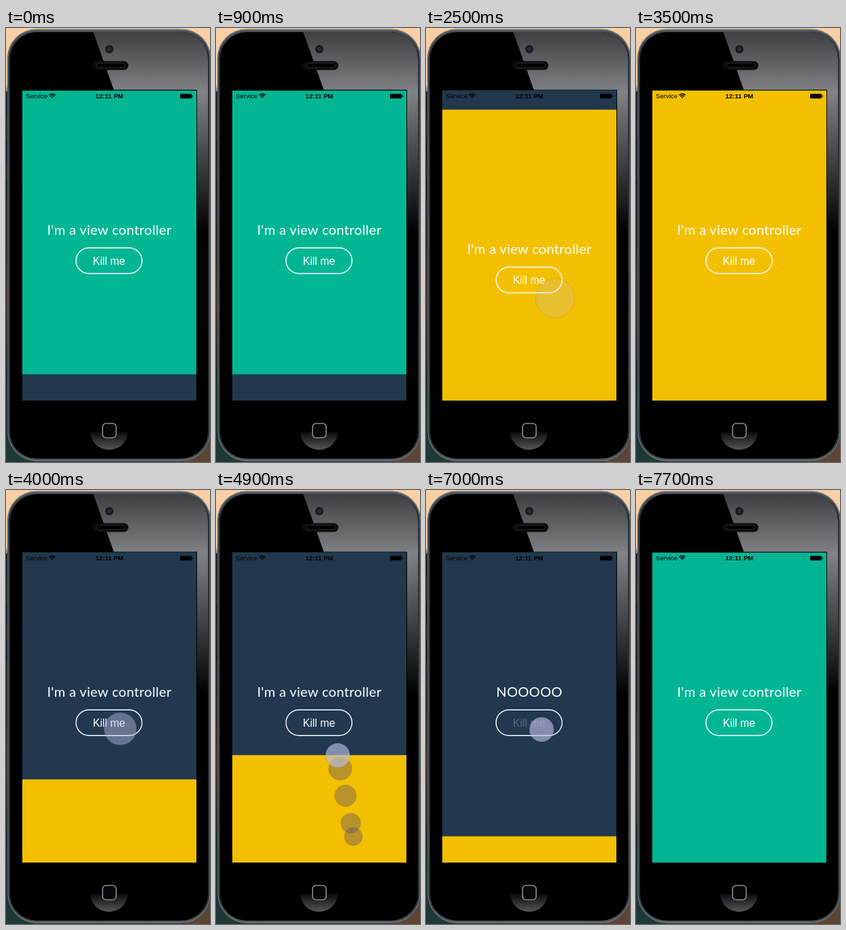
An HTML page for the animation above (8000 ms loop, 300 px wide and 636 px high).

```html
<!DOCTYPE html>
<html lang="en">
<head>
<meta charset="utf-8">
<title>Stacked view controllers</title>
<style>
  html, body { margin: 0; width: 100%; height: 100%; overflow: hidden; background: #facfa5; }
  svg { display: block; width: 300px; height: 636px; }
  text { text-anchor: middle; }
  .title { font: 20px Lato, sans-serif; letter-spacing: .33px; fill: #fff; }
  .label { font: 15.8px "Liberation Sans", Arial, sans-serif; fill: #fff; }
  .status { font: 9.6px "Liberation Sans", Arial, sans-serif; fill: #000; }
  .clock { font-weight: 700; }
</style>
</head>
<body>
<svg viewBox="0 0 300 636">
  <defs>
    <linearGradient id="back" x2="0" y2="1">
      <stop offset="0" stop-color="#facfa5"/>
      <stop offset=".13" stop-color="#f3c9a2"/>
      <stop offset=".16" stop-color="#20292c"/>
      <stop offset=".5" stop-color="#2c2523"/>
      <stop offset=".62" stop-color="#4b3429"/>
      <stop offset=".8" stop-color="#182a2c"/>
      <stop offset="1" stop-color="#1f3a36"/>
    </linearGradient>
    <linearGradient id="rim" x2="0" y2="1">
      <stop offset="0" stop-color="#4c555c"/>
      <stop offset=".06" stop-color="#262d32"/>
      <stop offset=".5" stop-color="#2a3135"/>
      <stop offset=".94" stop-color="#2c3338"/>
      <stop offset="1" stop-color="#50575c"/>
    </linearGradient>
    <linearGradient id="gloss" gradientUnits="userSpaceOnUse" x1="0" y1="5" x2="0" y2="300">
      <stop offset="0" stop-color="#3c3e41"/>
      <stop offset=".3" stop-color="#808285"/>
      <stop offset=".6" stop-color="#48494c"/>
      <stop offset="1" stop-color="#000"/>
    </linearGradient>
    <linearGradient id="home" x2="0" y2="1">
      <stop offset="0" stop-color="#0b0b0c"/>
      <stop offset="1" stop-color="#55565a"/>
    </linearGradient>
    <clipPath id="face"><rect x="6" y="6" width="291" height="625" rx="39"/></clipPath>
    <clipPath id="screen"><rect x="24" y="91.5" width="256" height="454.5"/></clipPath>
  </defs>

  <rect width="300" height="636" fill="url(#back)"/>
  <path d="M270 0h30v90h-5z" fill="#facfa5"/>
  <path d="M262 636h38v-50z" fill="#5e4434"/>
  <g fill="#1a2125">
    <rect y="93" width="4" height="34"/>
    <rect y="166" width="4" height="30"/>
    <rect y="222" width="4" height="30"/>
  </g>
  <rect x="2" y="1.5" width="299" height="633.5" rx="43" fill="url(#rim)"/>
  <rect x="3" y="2.5" width="297" height="631.5" rx="42" fill="none" stroke="#7b858c"/>
  <rect x="6" y="6" width="291" height="625" rx="39" fill="#000"/>
  <path d="M128 5H298V300H230L159 92Z" fill="url(#gloss)" clip-path="url(#face)"/>

  <circle cx="152" cy="31" r="6" fill="#17181b"/>
  <circle cx="152" cy="31" r="3" fill="#292c3d"/>
  <rect x="127" y="48.5" width="53" height="13" rx="6.5" fill="#0c0c0d"/>
  <rect x="133" y="51.5" width="42" height="6.5" rx="3.2" fill="#000" stroke="#323437" stroke-width=".8"/>

  <path d="M124 592H179A27.5 26 0 0 1 124 592Z" fill="url(#home)"/>
  <rect x="142" y="579.5" width="20" height="21" rx="5" fill="#08080a" stroke="#8b8d90" stroke-width="1.6"/>
  <rect x="23" y="90.5" width="258" height="456.5"/>

  <g clip-path="url(#screen)">
    <g id="cards"></g>
    <text class="status" x="29" y="103" style="text-anchor:start">Service</text>
    <g fill="none" stroke="#000" stroke-width="1.4">
      <path d="M63.4 98.4Q68 94.4 72.6 98.4M65.2 100.4Q68 98 70.8 100.4"/>
      <path d="M66.4 101.2H69.6L68 103.2Z" fill="#000" stroke="none"/>
    </g>
    <text class="status clock" x="152" y="103">12:11 PM</text>
    <rect x="256" y="96.5" width="17" height="6.8" rx="1.3"/>
    <rect x="273.6" y="98.6" width="1.4" height="2.6" rx=".6"/>
  </g>
  <g id="touches"></g>
</svg>

<script>
const LOOP = 8000, STEP = 100;
const TOP = 92, PEEK = 508, SLIDE = 456;
const TAP = { at: 6860, dur: 190, from: [170, 351], to: [170, 351] };
const KILL = { at: 7100, dur: 500 };
const SWIPES = [
  { card: 'navy',   at: 965,  dur: 270, from: [204, 508], to: [192, 340], rest: TOP },
  { card: 'yellow', at: 2127, dur: 190, from: [204, 508], to: [190, 396], rest: TOP },
  { card: 'yellow', at: 3620, dur: 300, from: [175, 170], to: [168, 350], rest: PEEK },
  { card: 'yellow', at: 4697, dur: 205, from: [202, 508], to: [179, 389], rest: TOP },
  { card: 'yellow', at: 5900, dur: 300, from: [175, 170], to: [168, 350], rest: PEEK }
];

const clamp = v => Math.min(1, Math.max(0, v));
const smooth = v => v * v * (3 - 2 * v);
const $ = id => document.getElementById(id);

function add(parent, tag, attrs, text) {
  const el = document.createElementNS('http://www.w3.org/2000/svg', tag);
  for (const k in attrs) el.setAttribute(k, attrs[k]);
  if (text) el.textContent = text;
  return parent.appendChild(el);
}

function makeCard(color) {
  const g = add($('cards'), 'g', {});
  add(g, 'rect', { x: 24, y: TOP - .5, width: 256, height: 457, fill: color });
  const title = add(g, 'text', { class: 'title', x: 152, y: 303 }, "I'm a view controller");
  add(g, 'rect', { x: 103, y: 322.3, width: 97, height: 37.5, rx: 18.75,
    fill: 'none', stroke: '#fff', 'stroke-width': 1.4 });
  const label = add(g, 'text', { class: 'label', x: 151.5, y: 346.8 }, 'Kill me');
  return { title, label, moveTo: y => g.setAttribute('transform', `translate(0 ${y - TOP})`) };
}

makeCard('#02b694');
const navy = makeCard('#21384f');
const yellow = makeCard('#f3c000');

const trail = Array.from({ length: 5 }, () => add($('touches'), 'circle', { fill: '#5c4c68' }));
const finger = add($('touches'), 'circle', { fill: '#bcbee0', stroke: '#55586a' });

function pointAt(s, t) {
  const p = smooth(clamp((t - s.at) / s.dur));
  return s.from.map((v, i) => v + (s.to[i] - v) * p);
}

// Follows the finger, then decays towards the resting place.
function cardY(name, t) {
  let y = PEEK;
  for (const s of SWIPES) {
    if (s.card !== name || t < s.at) continue;
    y += pointAt(s, t)[1] - s.from[1];
    const since = t - s.at - s.dur;
    if (since > 0) y = since > 600 ? s.rest : s.rest + (y - s.rest) * Math.exp(-.013 * since);
  }
  return y;
}

function put(dot, [x, y], r, opacity) {
  dot.setAttribute('cx', x);
  dot.setAttribute('cy', y);
  dot.setAttribute('r', r);
  dot.setAttribute('opacity', opacity);
}

function drawTouch(t) {
  const s = [...SWIPES, TAP].find(s => t >= s.at && t < s.at + s.dur + 270);
  finger.setAttribute('opacity', 0);
  trail.forEach(d => d.setAttribute('opacity', 0));
  if (!s) return;
  const fade = clamp((t - s.at - s.dur) / 270);
  put(finger, pointAt(s, t), 18 + 12 * (1 - (1 - fade) ** 2), .64 * (1 - fade));
  finger.setAttribute('stroke-opacity', fade ? .8 : .25);
  if (fade || s === TAP) return;
  trail.forEach((d, i) => {
    const at = t - 50 * (i + 1);
    if (at >= s.at) put(d, pointAt(s, at), 17.5 - i * 1.3, .4);
  });
}

function draw(t) {
  const k = clamp((t - KILL.at) / KILL.dur);
  const navyY = cardY('navy', t) + SLIDE * smooth(k);
  navy.moveTo(navyY);
  yellow.moveTo(cardY('yellow', t) + navyY - TOP);
  navy.title.textContent = t >= TAP.at ? 'NOOOOO' : "I'm a view controller";
  const pressed = t >= TAP.at && t < TAP.at + TAP.dur;
  navy.label.setAttribute('opacity', pressed ? .25 : 1);
  drawTouch(t);
}

function tick() {
  draw(Math.floor(performance.now() % LOOP / STEP) * STEP);
  requestAnimationFrame(tick);
}
tick();
</script>
</body>
</html>
```
